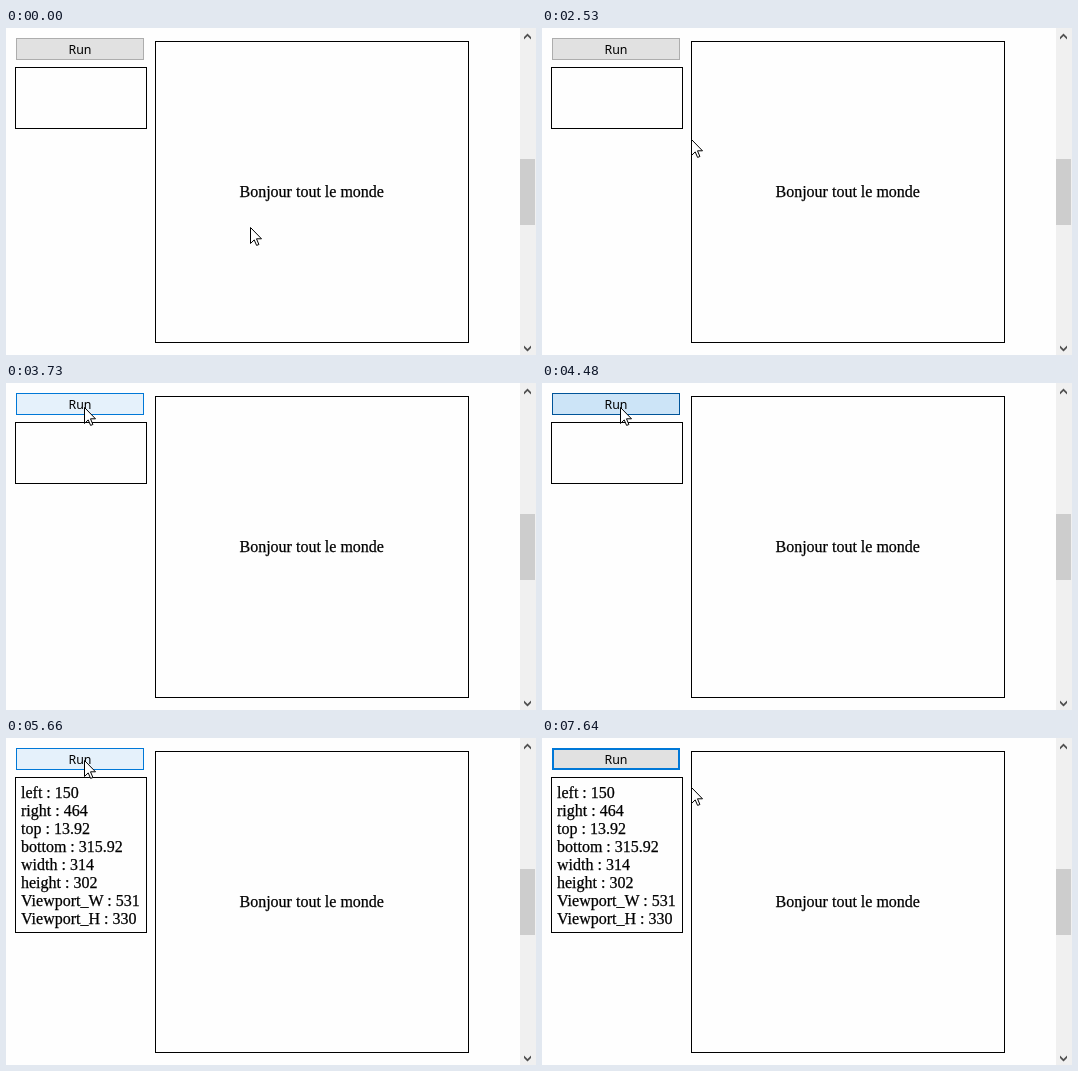
These frames come from a looping animation (530x327 px, 8 s). An HTML page:

```html
<!DOCTYPE html>
<html lang="fr">
<head>
<meta charset="utf-8">
<title>Run</title>
<style>
  html, body { margin: 0; width: 100%; height: 100%; overflow: hidden; background: #fefefe; }
  svg { display: block; }
  .box { fill: none; stroke: #000; }
  .serif { font: 16px "Liberation Serif", serif; stroke: #000; stroke-width: .25px; }
  .label { font: 12.4px "Noto Sans", sans-serif; text-anchor: middle; }
  .track { fill: #f0f0f0; }
  .thumb { fill: #cdcdcd; }
  .chevron { fill: #505050; }
</style>
</head>
<body>
<svg width="530" height="327" viewBox="0 0 530 327">
  <rect width="530" height="327" fill="#fefefe"/>

  <rect class="track" x="514" width="16" height="327"/>
  <rect class="thumb" x="514" y="131" width="15" height="66"/>
  <path id="up" class="chevron" d="M518 9l3.5-3.5 3.5 3.5v2.4l-3.5-3.5-3.5 3.5z"/>
  <use href="#up" transform="matrix(1 0 0 -1 0 329)"/>

  <svg x="10" y="10" width="128" height="22">
    <rect id="button" width="128" height="22"/>
  </svg>
  <text class="label" x="74" y="26">Run</text>

  <rect class="box" x="149.5" y="13.5" width="313" height="301"/>
  <text class="serif" x="233.5" y="169">Bonjour tout le monde</text>

  <rect id="panel" class="box" x="9.5" y="39.5" width="131" height="61"/>
  <g id="output" class="serif"></g>

  <path id="cursor" fill="#fff" stroke="#000" stroke-linejoin="round"
        d="M.5 .5V16.5L4.2 12.9 6.6 18.4 8.9 17.5 6.5 11.8H11.5Z"/>
</svg>
<script>
const LOOP = 8000, PRESS = 4480, RELEASE = 4630;
const ENTER = 3440, LEAVE = 7350;
const REFRESH = 140; // typical time between two visible cursor positions
const LINE = 18;
const $ = id => document.getElementById(id);

// Plays {time, ...style} steps; each style holds until the next step.
function play(id, steps) {
  const frames = steps.map(({ time, ...style }) =>
    ({ offset: time / LOOP, easing: 'steps(1, end)', ...style }));
  frames.push({ ...frames.at(-1), offset: 1 });
  $(id).animate(frames, { duration: LOOP, iterations: Infinity });
}

// The readout is the rectangle of the large box.
const box = { left: 150, top: 13.92, width: 314, height: 302 };
const readout = {
  left: box.left, right: box.left + box.width,
  top: box.top, bottom: box.top + box.height,
  width: box.width, height: box.height,
  Viewport_W: 531, Viewport_H: 330
};
const lines = Object.entries(readout).map(([name, value]) => `${name} : ${value}`);
$('output').innerHTML = lines
  .map((line, i) => `<text x="15" y="${60 + LINE * i}">${line}</text>`).join('');

// The pointer glides between a few key points, sampled at the refresh interval.
let x = 244, y = 199;
const path = [];
const place = (time, px, py) => path.push({
  time, transform: `translate(${Math.round(px)}px, ${Math.round(py)}px)`
});
function glide(start, end, toX, toY, power = 1) {
  const count = Math.round((end - start) / REFRESH) + 1;
  for (let i = 1; i <= count; i++) {
    const time = count > 1 ? start + (end - start) * (i - 1) / (count - 1) : start;
    const p = (i / count) ** power;
    place(time, x + (toX - x) * p, y + (toY - y) * p);
  }
  [x, y] = [toX, toY];
}
place(0, x, y);
glide(1460, 1860, 197, 175, 1.6);
glide(2270, 2530, 149, 111);
glide(2830, 2980, 107, 51, 2.6);
glide(3290, ENTER, 84, 28, 2.6);
glide(3600, 3730, 78, 24);
glide(5660, 5660, 78, 22);
glide(6640, 6640, 80, 22);
glide(6910, 7060, 89, 27, 2.6);
glide(7220, 7480, 146, 48, 2.2);
glide(7640, 7640, 149, 49);
play('cursor', path);

// The button clips its stroke to half, so the visible border is half as wide.
const look = (fill, stroke, border = 1) => ({ fill, stroke, strokeWidth: `${2 * border}px` });
const idle = look('#e1e1e1', '#adadad');
const hover = look('#e5f1fb', '#0078d7');
const active = look('#cce4f7', '#005499');
const focus = look('#e1e1e1', '#0078d7', 2);
play('button', [
  { time: 0, ...idle }, { time: ENTER, ...hover }, { time: PRESS, ...active },
  { time: RELEASE, ...hover }, { time: LEAVE, ...focus }
]);

play('panel', [
  { time: 0, height: '61px' },
  { time: RELEASE, height: `${11 + LINE * lines.length}px` }
]);
play('output', [{ time: 0, opacity: 0 }, { time: RELEASE, opacity: 1 }]);
</script>
</body>
</html>
```
